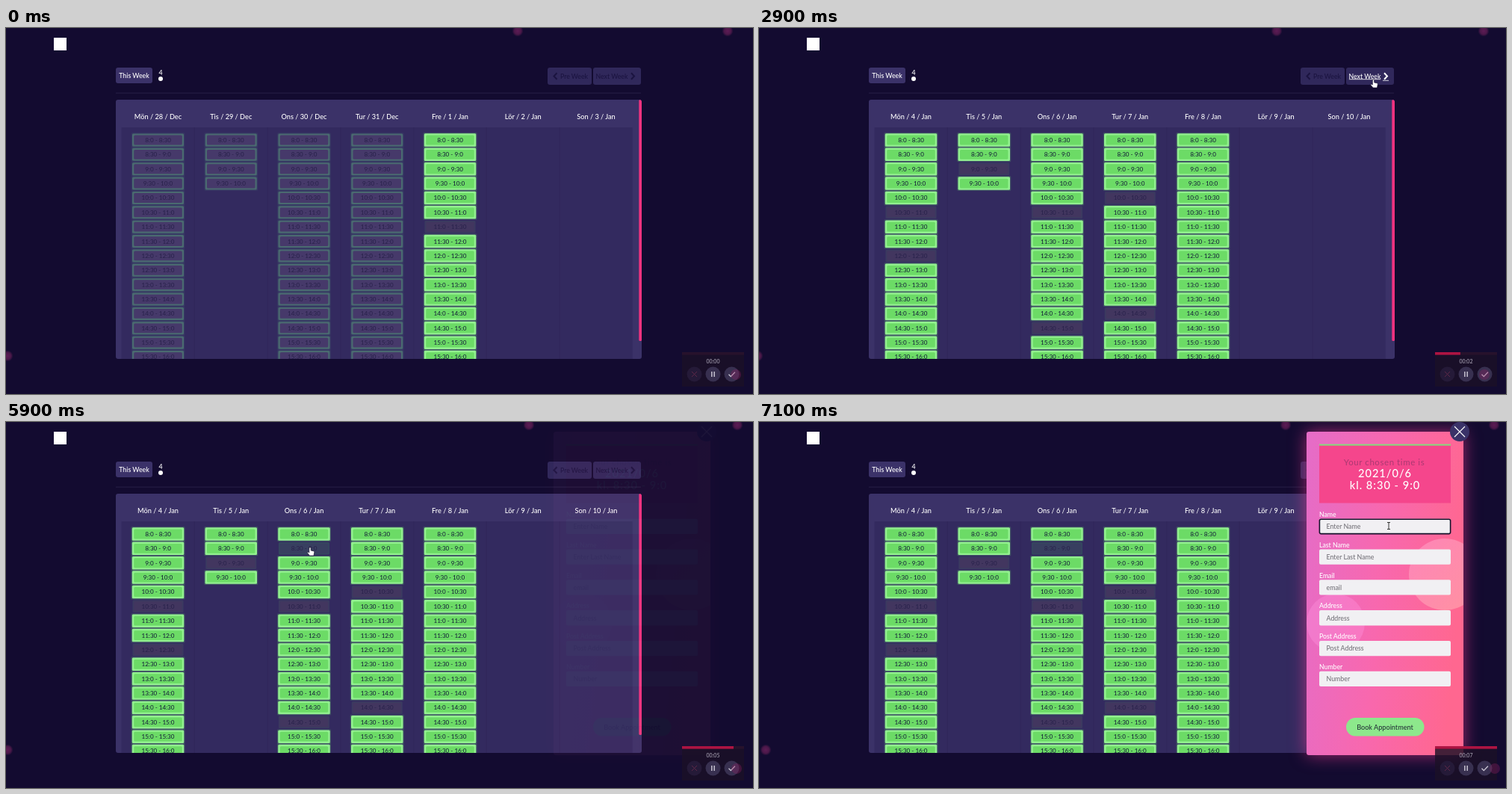
These frames come from a looping animation (1000 px wide and 490 px high, 7200 ms). An HTML page:

```html
<!DOCTYPE html>
<html lang="sv">
<head>
<meta charset="utf-8">
<title>Weekly booking</title>
<style>
  html, body { margin: 0; width: 100%; height: 100%; overflow: hidden; background: #130b30; }
  svg { display: block; width: 100vw; height: 100vh; }
  text { font-family: Lato, "Open Sans", sans-serif; font-weight: 500; white-space: pre; }
  .status { font-family: "Open Sans", "Noto Sans", sans-serif; }
  #panelBox { filter: drop-shadow(0 0 11px rgba(255, 60, 150, .6)); }
</style>
</head>
<body>
<svg id="stage" viewBox="0 0 1000 490" preserveAspectRatio="none">
  <defs>
    <linearGradient id="pink" x1="0" y1="0.2" x2="1" y2="0.4">
      <stop offset="0" stop-color="#e66cc6"/>
      <stop offset=".5" stop-color="#f868ae"/>
      <stop offset="1" stop-color="#ff6790"/>
    </linearGradient>
    <linearGradient id="orb" x1="0" y1="0" x2="1" y2="1">
      <stop offset="0" stop-color="#ff8fc0"/>
      <stop offset="1" stop-color="#ffa0a6"/>
    </linearGradient>
    <radialGradient id="dot">
      <stop offset="0" stop-color="#5d1c55"/>
      <stop offset=".6" stop-color="#4b1849"/>
      <stop offset="1" stop-color="#4b1849" stop-opacity="0"/>
    </radialGradient>
    <clipPath id="boardClip"><rect x="147" y="96" width="704" height="347" rx="3"/></clipPath>
    <clipPath id="panelClip"><rect x="733" y="13" width="210" height="433" rx="3"/></clipPath>
  </defs>
  <rect width="1000" height="490" fill="#130b30"/>
  <g id="dots"></g>
  <g id="header"></g>
  <g id="board" clip-path="url(#boardClip)"></g>
  <g id="panel"></g>
  <g id="statusLine"></g>
  <g id="recorder"></g>
  <g id="cursor">
    <path id="hand" d="M-1.2 .9Q-1.2 -.2 0 -.2T1.2 .9V4L5 4.8Q6 5.2 5.8 6.5L5 11H-.5L-3.6 7.2Q-3.8 6 -2.6 6L-1.2 7Z" fill="#fff" stroke="#15102c" stroke-width=".7"/>
    <path id="arrow" d="M0 0V10L2.4 7.8L4 11.2L5.5 10.5L4 7.3H7Z" fill="#fff" stroke="#15102c" stroke-width=".7"/>
    <path id="beam" d="M-2 -4.5H2M0 -4.5V4.5M-2 4.5H2" fill="none" stroke="#333" stroke-width="1"/>
  </g>
</svg>
<script>
(() => {
const LOOP = 7200, STEP = 100;
const $ = id => document.getElementById(id);

function add(parent, tag, attrs, content) {
  const el = document.createElementNS('http://www.w3.org/2000/svg', tag);
  for (const k in attrs) el.setAttribute(k, attrs[k]);
  if (content !== undefined) el.textContent = content;
  parent.appendChild(el);
  return el;
}
const rect = (p, x, y, width, height, fill, more) =>
  add(p, 'rect', { x, y, width, height, fill, ...more });
const circle = (p, cx, cy, r, fill, more) => add(p, 'circle', { cx, cy, r, fill, ...more });
const line = (p, d, stroke, width) =>
  add(p, 'path', { d, stroke, 'stroke-width': width, fill: 'none' });
// y is the middle of the capitals
const label = (p, str, x, y, size, fill, more) =>
  add(p, 'text', { x, y: y + size * .36, 'font-size': size, fill, ...more }, str);
const MID = { 'text-anchor': 'middle' };
const show = (el, on) => el.setAttribute('visibility', on ? 'visible' : 'hidden');

// Header
const header = $('header');
rect(header, 64, 13, 17, 17, '#fff');
rect(header, 147, 53, 49, 21, '#3b3269', { rx: 3 });
label(header, 'This Week', 171.5, 63.5, 8.8, '#fff', { ...MID, 'font-weight': 700 });
label(header, '4', 207, 59.5, 8.8, '#fff', MID);
circle(header, 207, 68, 3, '#fff');
rect(header, 147, 86.6, 703, 1, '#282046');

function navButton(x, w, name, textX, arrowX, dir) {
  rect(header, x, 53, w, 23, '#30285b', { rx: 3 });
  const make = (fill, on) => {
    const g = add(header, 'g', {});
    label(g, name, textX, 64.5, 8.7, fill, MID);
    line(g, `M${arrowX - 2 * dir} 60.2l${4 * dir} 4.3l${-4 * dir} 4.3`, fill, 2);
    if (on) {
      const half = name.length * 2.35;
      line(g, `M${textX - half} 68.7h${half * 2}M${arrowX - 4} 70.3h8`, fill, .8);
    }
    return g;
  };
  return { idle: make('#1b1440', false), hot: make('#fff', true) };
}
const prev = navButton(725, 59, 'Pre Week', 760.5, 735.5, -1);
const next = navButton(786, 64, 'Next Week', 811, 839, 1);

// Calendar
const COL = 97.75, ROW = 19.37, FIRST = 203.5;
const DAYS = ['Mön', 'Tis', 'Ons', 'Tur', 'Fre', 'Lör', 'Son'];
const board = $('board');
rect(board, 147, 96, 704, 347, '#3b3268');
rect(board, 154.6, 133, 684, 310, '#332a5f');
for (let i = 1; i < 7; i++) rect(board, 154.6 + i * COL - .5, 133, 1, 310, '#30275b');

const slot = n => `${8 + (n >> 1)}:${n % 2 ? 30 : 0}`;

function cell(g, col, row, kind) {
  const x = FIRST + col * COL, y = 150 + row * ROW;
  const box = (w, h, fill, more) => rect(g, x - w / 2, y - h / 2, w, h, fill, { rx: 1.5, ...more });
  let ink = '#2a234c';
  if (kind === 'free') {
    box(72, 20, '#6fe07a', { opacity: .2 });
    box(69.5, 17.5, '#92f08f');
    box(64.5, 12.8, '#6cdb66');
    ink = '#17263a';
  } else if (kind === 'past') {
    box(71.5, 19.5, '#5a9a80', { opacity: .13 });
    box(69, 17, '#4a6a70');
    box(64.5, 12.8, '#46396a');
  } else {
    box(68, 16.5, kind === 'picked' ? '#34465f' : '#3b3a60');
    box(64.5, 13, kind === 'picked' ? '#383f60' : '#42365f');
  }
  label(g, `${slot(row)} - ${slot(row + 1)}`, x, y, 8.1, ink, MID);
}

// Booked slots are written as "column.row"
function week(dates, past, booked) {
  const g = add(board, 'g', {});
  dates.forEach((d, col) => {
    label(g, `${DAYS[col]} / ${d}`, FIRST + col * COL, 119, 9.2, '#fff', MID);
    if (col > 4) return;
    for (let row = 0; row < (col === 1 ? 4 : 16); row++) {
      const taken = booked.includes(`${col}.${row}`);
      cell(g, col, row, taken ? 'booked' : col < past ? 'past' : 'free');
    }
  });
  return g;
}
const january = from => DAYS.map((_, i) => `${from + i} / Jan`);
const weeks = [
  week(['28 / Dec', '29 / Dec', '30 / Dec', '31 / Dec', ...january(1).slice(0, 3)], 4, ['4.6']),
  week(january(4), 0, ['0.5', '0.8', '1.2', '2.5', '2.13', '3.4', '3.12']),
  week(january(11), 5, [])
];
const picked = add(board, 'g', {});
rect(picked, FIRST + 2 * COL - 36, 159.6, 72, 19.4, '#332a5f');
cell(picked, 2, 1, 'picked');
rect(board, 847.3, 96, 3.7, 323, '#ef327f', { rx: 1.5 });

// Booking form
const panel = $('panel');
rect(panel, 733, 13, 210, 433, 'url(#pink)', { rx: 3, id: 'panelBox' });
const orbs = add(panel, 'g', { 'clip-path': 'url(#panelClip)' });
circle(orbs, 918, 204, 48, 'url(#orb)', { opacity: .75 });
circle(orbs, 772, 269, 39, '#ff94e0', { opacity: .35 });
rect(panel, 750, 31, 176, 77.5, '#f5468c');
rect(panel, 750, 29.6, 176, 2, '#84dc7c');
label(panel, 'Your chosen time is', 837, 54, 11.4, '#b03a74', { ...MID, 'letter-spacing': .6 });
label(panel, '2021/0/6', 838, 68.5, 14.6, '#fff', { ...MID, 'letter-spacing': 1 });
label(panel, 'kl. 8:30 - 9:0', 838, 84.5, 14.6, '#fff', { ...MID, 'letter-spacing': 1 });
[['Name', 'Enter Name'], ['Last Name', 'Enter Last Name'], ['Email', 'email'],
 ['Address', 'Address'], ['Post Address', 'Post Address'], ['Number', 'Number']]
  .forEach(([name, hint], i) => {
    const y = 129.7 + i * 40.8;
    label(panel, name, 750, y - 5.8, 8.7, '#fff');
    rect(panel, 750, y, 176, 20.3, '#f1f0f3', { rx: 2 });
    label(panel, hint, 759.5, y + 10.3, 8.8, '#75737a');
  });
const focusRing = rect(panel, 750.4, 130.2, 175.2, 19.4, 'none',
  { rx: 2, stroke: '#14122a', 'stroke-width': 1.6 });
rect(panel, 786, 396, 104.5, 24.5, '#8de88c', { rx: 12.2 });
label(panel, 'Book Appointment', 838, 408.3, 9.1, '#26343a', MID);
circle(panel, 938, 13, 13, '#3a3268');
line(panel, 'M931 6l14 14M945 6l-14 14', '#fff', 1.1);

// Browser status line
function statusBar(w, str, x, size) {
  const g = add($('statusLine'), 'g', {});
  rect(g, 0, 483.6, w, 6.4, '#050308');
  label(g, str, x, 488.3, size, '#fff', { class: 'status' });
  return g;
}
const linkBar = statusBar(125, 'localhost:3000/changeD/?change=nextweek', -2, 6);
const waitBar = statusBar(330, 'Väntar på localhost...', -2, 5.6);

// Screen recorder
const rec = $('recorder');
rect(rec, 905, 434, 83, 46, '#1b1026', { opacity: .82 });
rect(rec, 905, 434, 83, 3.6, '#27122c');
const bar = rect(rec, 905, 434, 0, 3.6, '#ad1442');
const clock = label(rec, '00:00', 946.5, 446, 7, '#a7a1b2', MID);
circle(rec, 921.5, 463.5, 10, '#251a38');
circle(rec, 946.5, 463.5, 10, '#383050');
circle(rec, 971.5, 463.5, 10, '#383050');
line(rec, 'M918 460l7 7M925 460l-7 7', '#5d2848', 1);
line(rec, 'M944.8 460v7M948.2 460v7', '#cfcbd8', 1.4);
line(rec, 'M967.5 463.8l2.8 2.8l5.6 -5.8', '#cfcbd8', 1.3);
const glow = circle(rec, 0, 464, 7, '#8c1f62', { opacity: .35 });

const dots = [4, 439, 4].map(y => circle($('dots'), 0, y, 7.5, 'url(#dot)'));

// Rows are [time, ...values]; linear in between
function track(t, rows) {
  const i = rows.findIndex(r => r[0] > t);
  if (i < 0) return rows[rows.length - 1].slice(1);
  if (i === 0) return rows[0].slice(1);
  const a = rows[i - 1], b = rows[i], k = (t - a[0]) / (b[0] - a[0]);
  return a.slice(1).map((v, j) => v + (b[j + 1] - v) * k);
}
const smooth = k => k * k * (3 - 2 * k);

// The drift restarts at every page load
const DRIFT = [
  [0, 685, 2, 966, 977], [1800, 704, 11, 973, 987], [2299, 706, 13, 975, 990],
  [2300, 685, -7, 966, 966], [2900, 693, -2, 970, 971], [3499, 699, 2, 973, 975],
  [3500, 687, -6, 968, 968], [4700, 701, 2, 977, 977], [4899, 703, 4, 978, 979],
  [4900, 688, -5, 972, 970], [5900, 700, 2, 979, 978], [6300, 703, 6, 980, 980],
  [7100, 705, 9, 984, 985]
];
const POINTER = [
  [500, 990, 400], [900, 900, 200], [1300, 824, 74], [1400, 822.5, 69], [3800, 822.5, 69],
  [4200, 775, 72], [4500, 728, 77], [5100, 728, 77], [5400, 520, 140], [5600, 407, 168],
  [6400, 407, 168], [6600, 620, 160], [6800, 820, 141], [6900, 843, 139]
];

function render(t) {
  const within = (a, b) => t >= a && t < b;

  const drift = track(t, DRIFT);
  dots.forEach((d, i) => d.setAttribute('cx', drift[i]));
  glow.setAttribute('cx', drift[3]);

  const current = t < 2300 ? 0 : t < 3500 ? 1 : t < 4900 ? 2 : 1;
  weeks.forEach((w, i) => show(w, i === current));
  show(picked, t >= 5600);

  const onNext = within(1400, 3900), onPrev = within(4300, 5200);
  show(next.hot, onNext);
  show(next.idle, !onNext);
  show(prev.hot, onPrev);
  show(prev.idle, !onPrev);
  show(linkBar, within(1400, 2300));
  show(waitBar, within(4600, 4900));

  const fade = Math.min(1, Math.max(0, (t - 5800) / 800));
  panel.setAttribute('opacity', smooth(fade));
  show(focusRing, t >= 6900);

  const [x, y] = track(t, POINTER);
  $('cursor').setAttribute('transform', `translate(${x} ${y})`);
  const hand = onNext || onPrev || within(5500, 6500), beam = t >= 6800;
  show($('hand'), hand);
  show($('beam'), beam);
  show($('arrow'), t >= 500 && !hand && !beam);

  bar.setAttribute('width', 83 * Math.min(1, t / 7100));
  clock.textContent = '00:0' + Math.floor(t / 1000);
}

const start = performance.now();
function tick() {
  const t = (performance.now() - start) % LOOP;
  render(Math.floor(t / STEP) * STEP);
  requestAnimationFrame(tick);
}
tick();
})();
</script>
</body>
</html>
```
